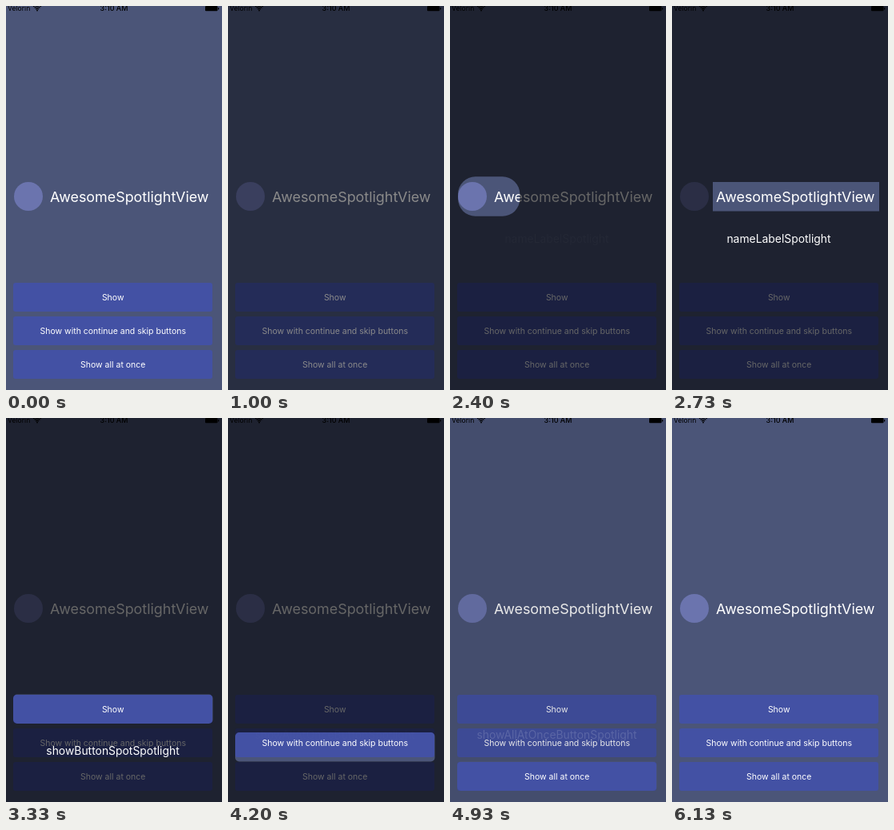
Write an HTML page with a canvas that moves like this. It is 270x480 px and loops after 6.54 s.

```html
<!DOCTYPE html>
<html lang="en">
<head>
<meta charset="utf-8">
<title>Spotlight walkthrough</title>
<style>
  html, body { margin: 0; width: 100%; height: 100%; overflow: hidden; background: #4b5578; }
  canvas { display: block; width: 270px; height: 480px; }
</style>
</head>
<body>
<canvas id="stage"></canvas>
<script>
const LOOP = 6540, MOVE = 250, DIM = 0.6;
const FADE_IN = 830, FADE_OUT = 4745;
const canvas = document.getElementById('stage');
const ctx = canvas.getContext('2d');
const ratio = window.devicePixelRatio || 1;
canvas.width = 270 * ratio;
canvas.height = 480 * ratio;

const buttons = [
  { y: 346, label: 'Show' },
  { y: 388, label: 'Show with continue and skip buttons' },
  { y: 430, label: 'Show all at once' }
];

// box: x, y, width, height, corner radius; textY: centre of the first line
const spots = [
  { at: 1505, box: [2, 212, 52, 52, 26], textY: 298, lines: ['logoImageViewSpotlight'] },
  { at: 2375, box: [51, 220, 208, 36.5, 0], textY: 290.5, lines: ['nameLabelSpotlight'] },
  { at: 2845, box: [9, 345.5, 249.5, 36.5, 5], textY: 416, lines: ['showButtonSpotSpotlight'] },
  { at: 3645, box: [9, 387.5, 249.5, 36.5, 5], textY: 337,
    lines: ['showWithContinueAndSkipBut', 'tonSpotlight'] },
  { at: 4180, box: [9, 429.5, 249.5, 36.5, 5], textY: 396, lines: ['showAllAtOnceButtonSpotlight'] }
];
const closedBox = [28, 238, 0, 0, 0];

const easeOut = p => Math.sin(p * Math.PI / 2);
const easeInOut = p => (1 - Math.cos(p * Math.PI)) / 2;
const progress = (t, start) => Math.min(1, Math.max(0, (t - start) / MOVE));

function text(str, x, y, size, { align = 'center', color = '#fff', weight = 400 } = {}) {
  ctx.font = `${weight} ${size}px Inter, Roboto, sans-serif`;
  ctx.textAlign = align;
  ctx.fillStyle = color;
  ctx.fillText(str, x, y + size * 0.36);
}

function roundBox(x, y, w, h, r, color) {
  ctx.beginPath();
  ctx.roundRect(x, y, w, h, r);
  ctx.fillStyle = color;
  ctx.fill();
}

function drawStatusBar() {
  const black = { color: '#000' };
  text('Velorin', 2, 3.2, 8.6, { ...black, align: 'left' });
  text('3:10 AM', 135, 3.2, 9, { ...black, weight: 500 });
  ctx.strokeStyle = '#000';
  ctx.lineWidth = 1.3;
  for (const r of [2.8, 5, 7.1]) {
    ctx.beginPath();
    ctx.arc(39, 6, r, -Math.PI * 0.74, -Math.PI * 0.26);
    ctx.stroke();
  }
  roundBox(38, 4.4, 2, 2, 1, '#000');
  roundBox(249, 0, 15.5, 6.2, 1, '#000');
  roundBox(265, 2, 1.2, 2.4, 0.5, '#000');
}

function drawScreen() {
  ctx.fillStyle = '#4b5578';
  ctx.fillRect(0, 0, 270, 480);
  drawStatusBar();
  roundBox(10, 220, 36, 36, 18, '#6b74ae');
  text('AwesomeSpotlightView', 55, 239, 17.9, { align: 'left' });
  for (const { y, label } of buttons) {
    roundBox(9, y, 249, 36, 3, '#4351a4');
    text(label, 133.7, y + 18, 10.5);
  }
}

function drawOverlay(t) {
  const fade = easeInOut(progress(t, FADE_IN)) - easeInOut(progress(t, FADE_OUT));
  if (fade <= 0) return;
  const index = spots.findLastIndex(s => t >= s.at);
  const spot = spots[index];
  const p = spot ? progress(t, spot.at) : 0;

  ctx.globalAlpha = fade * DIM;
  ctx.beginPath();
  ctx.rect(0, 0, 270, 480);
  if (spot) {
    const from = index ? spots[index - 1].box : closedBox;
    ctx.roundRect(...from.map((v, i) => v + (spot.box[i] - v) * easeOut(p)));
  }
  ctx.fillStyle = '#000';
  ctx.fill('evenodd');

  if (spot) {
    ctx.globalAlpha = fade * easeInOut(p);
    spot.lines.forEach((line, i) => text(line, 133.5, spot.textY + i * 17.5, 13.9));
  }
  ctx.globalAlpha = 1;
}

function frame() {
  const t = performance.now() % LOOP;
  ctx.setTransform(ratio, 0, 0, ratio, 0, 0);
  drawScreen();
  drawOverlay(t);
  requestAnimationFrame(frame);
}
frame();
</script>
</body>
</html>
```
